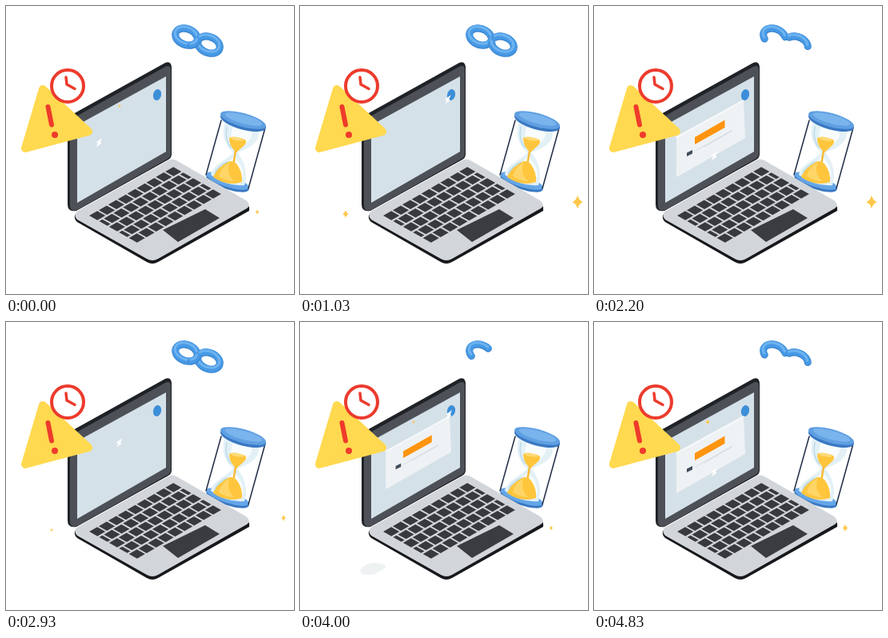
An HTML page with a canvas for the animation above (5000 ms loop, 360 px wide and 360 px high).

```html
<!DOCTYPE html>
<html>
<head>
<meta charset="utf-8">
<style>
html, body { margin: 0; width: 100%; height: 100%; overflow: hidden; background: #fff }
canvas { display: block; width: 360px; height: 360px }
</style>
</head>
<body>
<canvas id="stage" width="360" height="360"></canvas>
<script>
const ctx = document.getElementById('stage').getContext('2d');
ctx.lineCap = ctx.lineJoin = 'round';

const clamp = x => Math.max(0, Math.min(1, x));
const ramp = (t, a, b) => clamp((t - a) / (b - a));
const smooth = x => x * x * (3 - 2 * x);
const mix = (a, b, k) => a + (b - a) * k;

function fill(d, color) {
  ctx.fillStyle = color;
  ctx.fill(new Path2D(d));
}
function line(d, color, width) {
  ctx.strokeStyle = color;
  ctx.lineWidth = width;
  ctx.stroke(new Path2D(d));
}
function oval(x, y, rx, ry, color, tilt = 0) {
  ctx.fillStyle = color;
  ctx.beginPath();
  ctx.ellipse(x, y, rx, ry, tilt, 0, 7);
  ctx.fill();
}

function hourglass() {
  oval(277, 221, 28, 8, '#3a78c2', .32);
  oval(277, 218.5, 28, 7.5, '#65a6e8', .32);
  fill('M273 146L316 157C317 171 304 178 289 183C296 191 304 208 298 224Q276 226 256 211C258 198 276 193 284 183C274 175 269 162 273 146Z', '#e3f1f7');
  fill('M284 150L308 157C307 167 299 174 288 180C281 174 279 163 284 150Z', '#f8fcfd');
  fill('M285 188C293 195 299 208 296 215L266 206C269 200 279 196 285 188Z', '#f8fcfd');
  fill('M279 165Q284 161 299 167Q302 170 297 175L288 183Q279 176 279 165Z', '#ffc63d');
  fill('M280 165Q288 162 299 168Q288 170 280 165Z', '#ffdb78');
  line('M287 181L284 199', '#f7ba38', 2.5);
  fill('M259 214Q261 206 270 200Q281 190 288 197Q296 207 295 220Q277 226 259 214Z', '#ffc63d');
  fill('M280 195Q268 202 266 213Q276 219 285 219Q274 208 280 195Z', '#ffd567');
  line('M276 151Q273 167 281 177M261 209Q264 201 276 195', '#bcdbe8', 1.5);
  line('M269 143L250 211M323.500 154L303 228', '#202d45', 1.5);
  oval(296.5, 145, 29.5, 9.5, '#3a78c2', .27);
  oval(296.500, 142.5, 29.5, 8.5, '#5f9fe2', .27);
  oval(297, 141.5, 24, 5.5, '#7ab4ec', .27);
}

// Maps keyboard coordinates (0..1) to the slanted surface.
const keyPoint = (u, v) => `${102 + 107 * u + 62 * v} ${262 - 62 * u + 35 * v}`;

function key(u0, u1, v0, v1) {
  fill('M' + [[u0, v0], [u1, v0], [u1, v1], [u0, v1]].map(p => keyPoint(...p)).join('L') + 'Z', '#37393d');
}

function keyboard() {
  const cols = 9, rows = 5, gu = .009, gv = .018;
  for (let r = 0; r < rows; r++) {
    const shift = r % 2 / 2;
    for (let c = 0; c < cols + shift; c++) {
      const from = Math.max(0, c - shift) / cols;
      const to = Math.min(cols, c + 1 - shift) / cols;
      key(from + gu, to - gu, r / rows + gv, (r + 1) / rows - gv);
    }
  }
}

function laptop() {
  fill('M77 145Q77 139 82 136L199 71Q207 68 207 78L207 185Q207 190 203 192L88 256Q77 258 77 248Z', '#1f2226');
  fill('M80 148Q80 142 86 139L199 76Q206 73 206 80L206 184Q206 189 202 191L89 255Q80 258 80 249Z', '#4d5157');
  fill('M89 149L200 88L200 182L89 246Z', '#d5e1e9');

  fill('M86 261L300 246Q305 250 304 256L190 320Q183 324 176 320L89 270Q85 267 86 261Z', '#17181b');
  fill('M90 256L203 193Q208 190 213 193L300 243Q307 249 301 253L190 316Q183 320 176 316L89 267Q83 261 90 256Z', '#d2d6da');
  keyboard();
  fill('M196 280L249 254L267 265L215 295Z', '#3b3c40');
}

function panel(p) {
  const k = smooth(ramp(p, 1050, 1420));
  if (!k) return;
  ctx.save();
  ctx.translate(188, 115);
  ctx.scale(k, k);
  ctx.translate(-188, -115);
  fill('M103 164L187 118L189 165L103 214Z', '#eff2f4');
  line('M103 164L187 118', '#fafcfc', 1.5);
  fill('M126 164L163.500 142.500L163.500 152L126 173Z', '#ff940f');
  line('M137 176L172 156', '#d6dde1', 1.5);
  fill('M116 183.500L123 180L123 184.500L116 188Z', '#414d5d');
  line('M127 181L139 174', '#dde3e7', 1.2);
  ctx.restore();
}

function cursor(p) {
  const go = Math.sin(ramp(p, 0, 1150) * Math.PI / 2);
  const back = smooth(ramp(p, 1500, 2100));
  const x = mix(mix(116, 186, go), 150, back);
  const y = mix(mix(171, 116, go), 188, back);
  ctx.save();
  ctx.translate(x, y);
  fill('M4 -6L-4 0L-1 0L-3 5L3 1L2 -1Z', '#fff');
  ctx.restore();
}

function warning() {
  const d = 'M46 104L103 157L24 178Z';
  fill(d, '#ffd94f');
  line(d, '#ffd94f', 10);
  line('M52.500 126L57 148.500', '#ef3b2c', 6);
  oval(61, 161, 4, 4, '#ef3b2c');

  oval(77, 100, 20, 20, '#fff');
  ctx.strokeStyle = '#ec3b2d';
  ctx.lineWidth = 4;
  ctx.beginPath();
  ctx.arc(77, 100, 20, 0, 7);
  ctx.stroke();
  line('M75 89L76 98L86 103.500', '#ec3b2d', 3.5);
}

// Draws the part from a to b (shares of a turn) of a link.
function link(x, y, start, dir, a, b) {
  if (b - a < .01) return;
  const tau = Math.PI * 2;
  const pass = (color, width, dx, dy) => {
    ctx.strokeStyle = color;
    ctx.lineWidth = width;
    ctx.beginPath();
    ctx.ellipse(x + dx, y + dy, 14.3, 10, .38, start + dir * a * tau, start + dir * b * tau, dir < 0);
    ctx.stroke();
  };
  pass('#347fca', 9, 0, .6);
  pass('#4799e5', 8, 0, 0);
  pass('#6db3f0', 3, -.5, -1.5);
}

function chain(p) {
  const gone = ramp(p, 950, 1430), grow = smooth(ramp(p, 1460, 2150));
  const broken = gone == 1;
  const a = .1 * (broken ? 1 - grow : gone);
  const left = mix(mix(1, .5, gone), .54, grow);
  const right = broken ? .36 * grow : 1 - ramp(p, 950, 1350);
  link(225.500, 38, -.5, -1, a, left);
  link(253.5, 48, -2.6, 1, 0, right);
  if (!gone) link(225.500, 38, -.1, 1, 0, .15);
}

function star(x, y, r) {
  if (r < .5) return;
  const w = r * .8, i = r * .2;
  ctx.save();
  ctx.translate(x, y);
  fill(`M0 ${-r}Q${i} ${-i} ${w} 0Q${i} ${i} 0 ${r}Q${-i} ${i} ${-w} 0Q${-i} ${-i} 0 ${-r}Z`, '#ffc84a');
  ctx.restore();
}

function stars(t) {
  const p = t % 1200;
  const first = Math.cos(clamp(Math.abs((p + 600) % 1200 - 800) / 260) * Math.PI / 2);
  const second = Math.min(1, ramp(p, 440, 570), 1 - ramp(p, 1080, 1170));
  star(142, 125, 6.5 * first);
  star(314, 257.500, 8.5 * first);
  star(347, 245, 8.5 * second);
  if (t < 2100 || t >= 2600) star(57, 260, 5 * second);
}

function puff(p) {
  const k = ramp(p, 1200, 1420) * (1 - ramp(p, 1460, 1650));
  if (!k) return;
  ctx.save();
  ctx.translate(75, 309);
  ctx.scale(k, Math.sqrt(k));
  fill('M1 0Q8 -8 24 -9Q42 -8 42 -3Q37 2 28 4Q25 9 9 8Q-1 7 1 0Z', '#eff2f3');
  ctx.restore();
}

function draw(t) {
  const p = t < 2600 ? t : Math.max(0, t - 2630);
  ctx.fillStyle = '#fff';
  ctx.fillRect(0, 0, 360, 360);
  puff(p);
  hourglass();
  laptop();
  panel(p);
  oval(189, 111, 5, 7, '#3c8ed8', .25);
  cursor(p);
  warning();
  chain(p);
  stars(t);
}

// The motion pauses in the middle and at the end of the loop.
function hold(t) {
  if (t >= 4830) return 4830;
  if (t >= 2100 && t < 2600) return t < 2200 ? 2100 : t < 2400 ? 2200 : 2400;
  return Math.floor(t / 100 * 3 + .01) * 100 / 3;
}

const begin = performance.now();
function frame() {
  draw(hold((performance.now() - begin) % 5000));
  requestAnimationFrame(frame);
}
frame();
</script>
</body>
</html>
```
